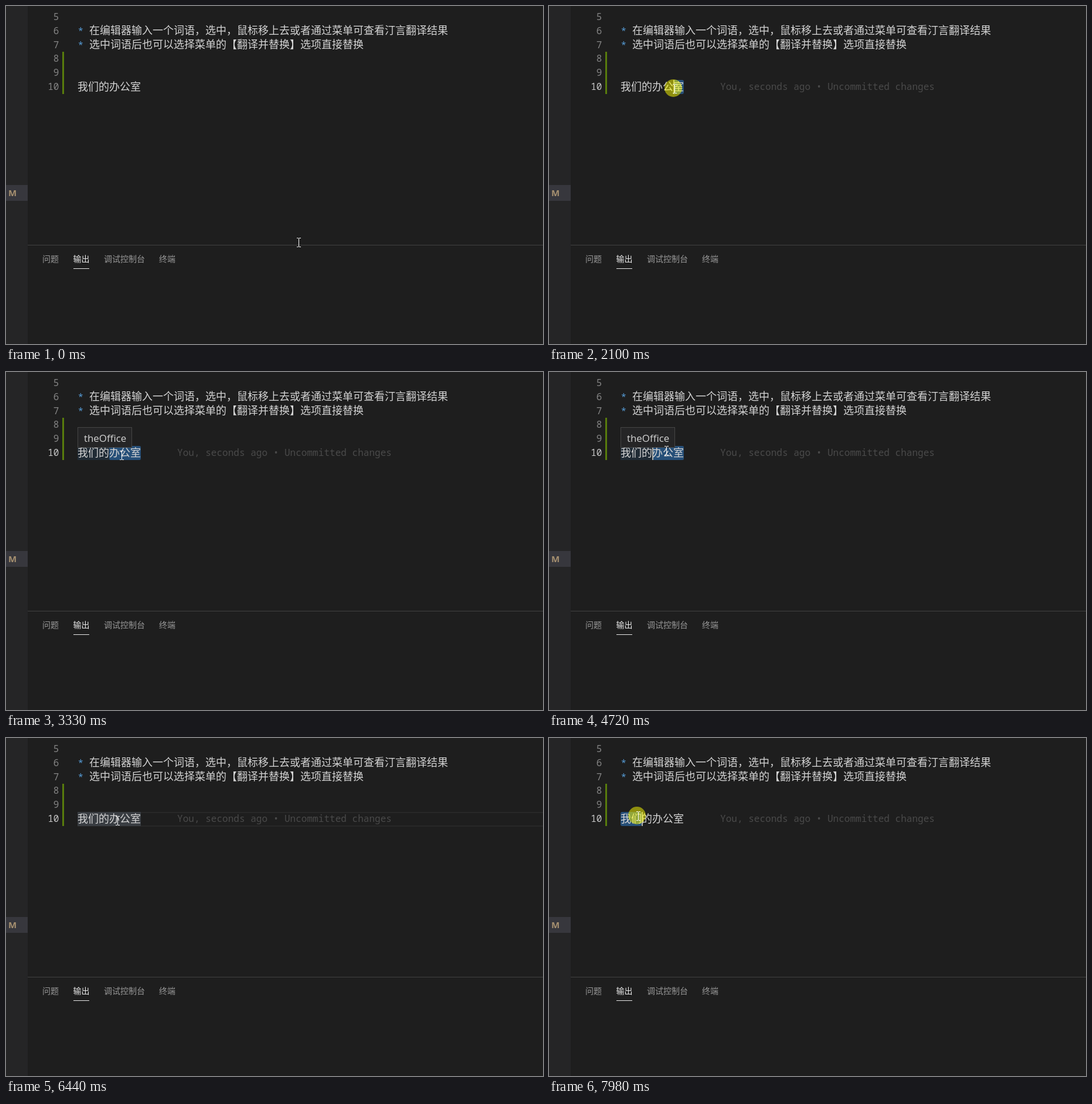
These frames come from a looping animation (916x576 px, 8000 ms). An HTML page:

```html
<!DOCTYPE html>
<html lang="zh-CN">
<head>
<meta charset="utf-8">
<title>Editor selection</title>
<style>
  html, body { margin: 0; width: 100%; height: 100%; overflow: hidden; background: #1e1e1e; }
  svg { display: block; width: 916px; height: 576px; }
  text { white-space: pre; }
  .mono { font: 16px "Noto Sans Mono", monospace; letter-spacing: .03px; }
  .cjk { font: 300 18px "Noto Sans CJK SC", "Noto Sans CJK", sans-serif; fill: #d4d4d4; }
  .tab { font: 14px "Noto Sans CJK SC", "Noto Sans CJK", sans-serif; fill: #979797; }
  .num { fill: #858585; text-anchor: end; }
  .star { fill: #569cd6; }
  .tip { font: 16.9px "Open Sans", sans-serif; font-variant-ligatures: none; fill: #d4d4d4; }
  .badge { font: bold 15px "Open Sans", sans-serif; fill: #a69070; }
</style>
</head>
<body>
<svg viewBox="0 0 916 576">
  <rect width="916" height="576" fill="#1e1e1e"/>
  <rect width="37" height="576" fill="#252526"/>
  <rect y="305" width="37" height="27" fill="#37373d"/>
  <text class="badge" x="4" y="324">M</text>

  <g id="numbers" class="mono"></g>
  <rect x="96" y="78" width="3" height="72" fill="#587c0c"/>

  <path id="line" d="M122 127H916M122 150H916" stroke="#282828" stroke-width="2"/>
  <rect id="word" x="122" y="126" width="108" height="24" fill="#393d42"/>
  <rect id="hover" x="122" y="126" width="108" height="24" fill="#264f78" fill-opacity=".25"/>
  <rect id="sel" y="126" height="24" rx="3" fill="#264f78"/>

  <text class="mono star" x="122.5" y="49">*</text>
  <text class="cjk" x="142" y="48">在编辑器输入一个词语，选中，鼠标移上去或者通过菜单可查看汀言翻译结果</text>
  <text class="mono star" x="122.5" y="73">*</text>
  <text class="cjk" x="142" y="72">选中词语后也可以选择菜单的【翻译并替换】选项直接替换</text>
  <text class="cjk" x="122" y="143.5">我们的办公室</text>
  <text id="blame" class="mono" x="292" y="143" fill="#4a4a4a">You, seconds ago • Uncommitted changes</text>

  <rect x="37" y="407" width="879" height="1" fill="#414141"/>
  <text class="tab" x="62" y="436">问题</text>
  <text class="tab" x="114.5" y="436" style="fill:#e7e7e7">输出</text>
  <text class="tab" x="167" y="436">调试控制台</text>
  <text class="tab" x="261" y="436">终端</text>
  <rect x="115" y="447" width="27" height="1" fill="#e7e7e7"/>

  <rect id="caret" y="126" width="2" height="24" fill="#aeafad"/>
  <g id="tip">
    <rect x="122.5" y="94.5" width="92" height="34" fill="#252526" stroke="#454545"/>
    <text class="tip" x="133" y="119">theOffice</text>
  </g>
  <circle id="press" r="15" fill="#ff0" fill-opacity=".5"/>
  <path id="mouse" d="M-3 -7.5H0M1 -7.5H4M.5 -7V7M-3 7.5H0M1 7.5H4" fill="none" stroke="#fff"/>
</svg>
<script>
const LOOP = 8000, TICK = 76.5, BLINK = 500;
const LEFT = 122, RIGHT = 230, CELL = 18;

// Gestures: drag over the last word, click beside it, drag from the line start
const DRAG = 1770, DROP = 2950, CLICK = 5810, CLEAR = 5890, REDRAG = 7430;
const HOVER = 3330;

// Pointer path: start, end, destination x, y
const PATH = [
  [70, 150, 473, 388], [380, 760, 266, 190],
  [930, 1160, 279, 166], [1235, 1540, 245, 141],
  [1850, 2720, 182, 141], [3100, 3250, 197, 142],
  [4570, 4720, 200, 134], [4970, 5200, 244, 143],
  [6040, 6190, 200, 142], [6440, 7280, 125, 133],
  [7600, 7980, 152, 133]
];

const $ = id => document.getElementById(id);
const [line, word, hover, sel, blame, caret, tip, press, mouse] =
  ['line', 'word', 'hover', 'sel', 'blame', 'caret', 'tip', 'press', 'mouse'].map($);

for (let i = 0; i < 6; i++) {
  $('numbers').insertAdjacentHTML('beforeend',
    `<text class="num" x="90.5" y="${24 + 23.8 * i}">${i + 5}</text>`);
}
const activeNum = $('numbers').lastElementChild;

const between = (t, a, b) => t >= a && t < b;
const show = (el, on) => el.setAttribute('visibility', on ? 'visible' : 'hidden');
const snap = x =>
  Math.min(RIGHT, Math.max(LEFT, LEFT + CELL * Math.round((x - LEFT) / CELL)));

// Each move slows down towards its end and advances once per tick.
function pointerAt(t) {
  let x = 499, y = 403;
  for (const [a, b, toX, toY] of PATH) {
    if (t < a) break;
    const steps = Math.round((b - a) / TICK) + 1;
    const step = Math.min(steps, 1 + Math.floor((t - a) / TICK + .1));
    const p = Math.sin(step / steps * Math.PI / 2);
    x += (toX - x) * p;
    y += (toY - y) * p;
  }
  return [Math.round(x), Math.round(y)];
}

function selectionAt(t) {
  if (between(t, DRAG, CLEAR)) return [RIGHT, snap(pointerAt(Math.min(t, DROP))[0])];
  if (t >= REDRAG) return [LEFT, snap(pointerAt(t)[0])];
  return [RIGHT, RIGHT];
}

function draw(t) {
  const [x, y] = pointerAt(t);
  const [anchor, head] = selectionAt(t);
  const focused = t >= DRAG;
  const pressed = between(t, DRAG, DROP) || between(t, CLICK, CLEAR) || t >= REDRAG;
  const blinkFrom = t < CLEAR ? 2520 : CLEAR;
  const lit = Math.floor((t - blinkFrom) / BLINK) % 2 === 0;

  mouse.setAttribute('transform', `translate(${x} ${y})`);
  press.setAttribute('cx', x - 2);
  press.setAttribute('cy', y - 1);
  show(press, pressed);

  sel.setAttribute('x', Math.min(anchor, head));
  sel.setAttribute('width', Math.abs(anchor - head));
  caret.setAttribute('x', head);
  show(caret, focused && (pressed || lit));

  show(line, focused && anchor === head);
  show(word, between(t, 6120, 7600));
  show(hover, between(t, HOVER, CLICK));
  show(tip, between(t, HOVER, CLICK));
  show(blame, t >= 2010);
  activeNum.style.fill = focused ? '#c6c6c6' : '';
}

const begin = performance.now();
function frame() {
  draw((performance.now() - begin) % LOOP);
  requestAnimationFrame(frame);
}
frame();
</script>
</body>
</html>
```
